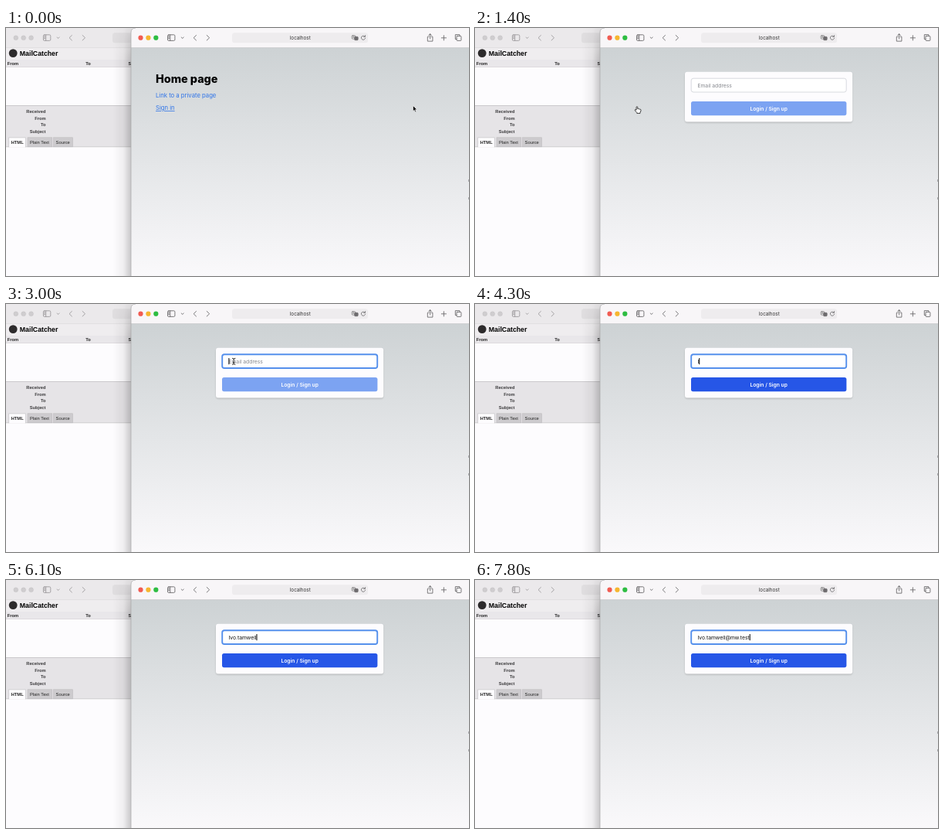
An HTML page that plays this animation: 600 by 321 pixels, repeating every 8000 ms.

```html
<!DOCTYPE html>
<html lang="en">
<head>
<meta charset="utf-8">
<title>Sign in by email</title>
<style>
  html, body { margin: 0; width: 100%; height: 100%; overflow: hidden; background: #fdfcfe; }
  svg { display: block; width: 100vw; height: 100vh; }
  text { font-family: Inter, sans-serif; white-space: pre; }
  .mail text { font: 5.76px "Liberation Sans", Arial, sans-serif; fill: #222; }
  .mail .b { font-weight: 700; }
  .mail .label { font-weight: 700; fill: #3b3a3c; text-anchor: end; }
  .mail .brand { font-size: 8.75px; font-weight: 700; fill: #000; }
  .icon { fill: none; stroke-width: .9; stroke-linecap: round; stroke-linejoin: round; }
  .link { font-size: 7.7px; fill: #2f74e8; }
  .field { font-size: 6.75px; }
</style>
</head>
<body>
<svg viewBox="0 0 600 321" preserveAspectRatio="none">
  <defs>
    <linearGradient id="sky" x1="0" y1="0" x2="0" y2="1">
      <stop offset="0" stop-color="#cdd2d4"/>
      <stop offset="1" stop-color="#faf9fb"/>
    </linearGradient>
    <linearGradient id="shade">
      <stop offset="0" stop-color="#000" stop-opacity="0"/>
      <stop offset=".55" stop-color="#000" stop-opacity=".05"/>
      <stop offset="1" stop-color="#000" stop-opacity=".22"/>
    </linearGradient>
    <linearGradient id="fadeIn" x1="0" y1="0" x2="0" y2="1">
      <stop offset="0" stop-color="#fff" stop-opacity=".25"/>
      <stop offset=".12" stop-color="#fff"/>
    </linearGradient>
    <mask id="shadeMask"><rect x="138" width="30" height="321" fill="url(#fadeIn)"/></mask>
    <filter id="soft" x="-10%" y="-20%" width="120%" height="150%">
      <feGaussianBlur stdDeviation="1.3"/>
    </filter>
    <g id="nav" class="icon">
      <rect x="0" y="8.8" width="9.4" height="7.6" rx="1.4"/>
      <path d="M3.3 8.8v7.6M1.2 10.7h.9M1.2 12.2h.9M1.2 13.7h.9"/>
      <path d="M17.7 12l1.5 1.4 1.5-1.4"/>
      <path d="M37 9.4l-3.4 3.3 3.4 3.3"/>
      <path d="M50.7 9.4l3.4 3.3-3.4 3.3"/>
    </g>
  </defs>

  <!-- Mail window -->
  <g class="mail">
    <rect width="170" height="321" fill="#fdfcfe"/>
    <rect width="170" height="25.5" fill="#ebe9eb"/>
    <rect y="25" width="170" height=".7" fill="#d2d0d2"/>
    <g fill="#cfcdcf" stroke="#bfbdbf" stroke-width=".4">
      <circle cx="12.8" cy="12.7" r="2.9"/>
      <circle cx="22.7" cy="12.7" r="2.9"/>
      <circle cx="32.6" cy="12.7" r="2.9"/>
    </g>
    <use href="#nav" x="48.4" stroke="#9d9b9e"/>
    <rect x="138" y="6.3" width="40" height="13" rx="3" fill="#e0dee0"/>
    <rect y="25.7" width="170" height="15.3" fill="#efedef"/>
    <circle cx="9.2" cy="32.6" r="5.4" fill="#2d2b2c"/>
    <text class="brand" x="17.8" y="35.8">MailCatcher</text>
    <rect y="41" width="170" height="9.5" fill="#e9e7ea"/>
    <rect y="50" width="170" height=".6" fill="#d0ced1"/>
    <text class="b" x="1.8" y="48">From</text>
    <text class="b" x="103.2" y="48">To</text>
    <text class="b" x="158.6" y="48">Subject</text>
    <rect y="100" width="170" height="54" fill="#e6e4e7"/>
    <rect y="100" width="170" height=".8" fill="#c4c2c5"/>
    <text class="label" x="51.5" y="109.9">Received</text>
    <text class="label" x="51.5" y="118.7">From</text>
    <text class="label" x="51.5" y="127.4">To</text>
    <text class="label" x="51.5" y="136.1">Subject</text>
    <g stroke="#bdbbbe" stroke-width=".6">
      <rect x="28" y="141.8" width="31.8" height="12" fill="#cdcbce"/>
      <rect x="61.6" y="141.8" width="24.8" height="12" fill="#cdcbce"/>
      <path d="M0 153.8h170"/>
      <path d="M3.6 154.3v-12.5h21.8v12.5" fill="#fdfcfe"/>
    </g>
    <text class="b" x="6.7" y="150.1">HTML</text>
    <text x="31" y="150">Plain Text</text>
    <text x="64.6" y="150">Source</text>
    <rect x="138" width="25" height="321" fill="url(#shade)" mask="url(#shadeMask)"/>
  </g>

  <!-- Browser window -->
  <path d="M162 321V6q0-6 6-6H600V321z" fill="url(#sky)"/>
  <rect x="162" y="25.5" width="438" height="295.5" fill="url(#sky)"/>
  <path d="M162 25.5V6q0-6 6-6H600V25.5z" fill="#f8f6f8"/>
  <rect x="162" y="25" width="438" height=".7" fill="#c6c8ca"/>
  <path d="M162 321V6q0-6 6-6" fill="none" stroke="#a9a9ab" stroke-width=".7"/>
  <circle cx="174.5" cy="12.7" r="3.1" fill="#f15b52"/>
  <circle cx="184.4" cy="12.7" r="3.1" fill="#f6b62f"/>
  <circle cx="194.3" cy="12.7" r="3.1" fill="#2dbd42"/>
  <use href="#nav" x="209.5" stroke="#6d6b6e"/>
  <rect x="293" y="6.3" width="176" height="13" rx="3" fill="#eeecee"/>
  <text x="381.3" y="15.1" font-size="6.3" text-anchor="middle" fill="#333">localhost</text>
  <g class="icon" stroke="#6d6b6e">
    <rect x="448.2" y="9.7" width="4.6" height="4.4" rx="1" fill="#fff" stroke-width=".7"/>
    <path d="M449.5 11h2M450.5 11l-1 2M450 11.6l1.4 1.4" stroke-width=".6"/>
    <rect x="451.6" y="11.3" width="4.6" height="4.4" rx="1" fill="#6d6b6e" stroke-width=".7"/>
    <path d="M465.2 11.2a2.6 2.6 0 1 0 .4 2M465.6 9.5l-.2 1.9-1.9-.1" stroke-width=".8"/>
    <path d="M548 11.2h-1.7v5.9h6.6v-5.9h-1.7M549.6 14V7.8M547.7 9.5l1.9-1.9 1.9 1.9"/>
    <path d="M567.4 9.7v6.2M564.3 12.8h6.2"/>
    <path d="M583.8 14.5h-1.5v-5.9h5.6v1.5"/>
    <rect x="584" y="10.4" width="5.9" height="6" rx=".8"/>
  </g>
  <path d="M599.5 196v3M599.5 219v3" stroke="#8b8d90" stroke-width=".7"/>

  <!-- Home page -->
  <g id="home">
    <text x="194" y="70.6" font-size="14.4" font-weight="800">Home page</text>
    <text class="link" x="194" y="90.4">Link to a private page</text>
    <text class="link" x="194" y="106.1" text-decoration="underline">Sign in</text>
  </g>

  <!-- Sign-in form -->
  <g id="form">
    <rect x="272.3" y="58" width="216.6" height="64.4" rx="3" opacity=".2" filter="url(#soft)"/>
    <rect x="272" y="56.8" width="217.2" height="64.6" rx="3" fill="#fdfcfe"/>
    <rect id="box" x="280.2" y="65.2" width="201" height="17.8" rx="2.8" fill="#fff"/>
    <text id="hint" class="field" x="288.4" y="76.6" fill="#85878d">Email address</text>
    <text id="typed" class="field" x="288.4" y="76.6" fill="#111"></text>
    <rect id="caret" y="70" width="1" height="8.2" fill="#000"/>
    <rect id="button" x="280" y="95" width="201.4" height="18.2" rx="2.6"/>
    <text class="field" x="380.7" y="106.5" font-weight="600" text-anchor="middle" fill="#fff">Login / Sign up</text>
  </g>

  <!-- Pointers, each with its hot spot at 0,0 -->
  <g id="arrow">
    <path d="M0 0V7.2L1.7 5.7 2.8 8.2 4 7.7 2.9 5.2H5.1z" fill="#000" stroke="#fff" stroke-width=".6"/>
  </g>
  <g id="hand">
    <path d="M-.9 4.2V.6Q-.9-.3-.1-.3T.8.6V2.7Q1.8 2.1 2.4 2.9 3.4 2.5 3.8 3.3 5 3 5 4.3 5 6.2 4 7.4V8.4H-.2V7.5Q-2 5.9-3 4.2-2.6 2.9-.9 4.2z"
      fill="#fff" stroke="#111" stroke-width=".8" stroke-linejoin="round"/>
  </g>
  <g id="beam" fill="none" stroke-linecap="round">
    <path d="M-1.7-4Q0-4 0-2.8 0-4 1.7-4M0-2.8V2.8M-1.7 4Q0 4 0 2.8 0 4 1.7 4M-.9 1.2H.9" stroke="#fff" stroke-width="1.7"/>
    <path d="M-1.7-4Q0-4 0-2.8 0-4 1.7-4M0-2.8V2.8M-1.7 4Q0 4 0 2.8 0 4 1.7 4M-.9 1.2H.9" stroke="#111" stroke-width=".9"/>
  </g>
</svg>
<script>
  const LOOP = 8000, TICK = 100;
  const PAGE_AT = 1400, FOCUS_AT = 3000, TYPE_AT = 4200;
  const EMAIL = 'Ivo.tamwell@mw.test';
  const KEYS = [4200, 4500, 4700, 4900, 5200, 5400, 5500, 5700, 5800, 6000, 6100,
                6500, 6700, 6800, 7000, 7200, 7400, 7500, 7700];
  const START = [527.5, 100.5], LINK = [210, 102], INPUT = [295.2, 74.3];

  const $ = id => document.getElementById(id);
  const show = (id, on) => $(id).setAttribute('visibility', on ? 'visible' : 'hidden');
  const set = (id, attrs) => {
    for (const k in attrs) $(id).setAttribute(k, attrs[k]);
  };
  const clamp = v => Math.min(1, Math.max(0, v));
  const ease = (t, from, to) => {
    const u = clamp((t - from) / (to - from));
    return u * u * (3 - 2 * u);
  };
  const mix = (a, b, p) => a.map((v, i) => v + (b[i] - v) * p);

  function pointerAt(t) {
    if (t < 1900) {
      const p = ease(t, 0, 1200);
      const [x, y] = mix(START, LINK, p);
      return [x, y + 27 * Math.sin(Math.PI * p ** 0.7) ** 2];
    }
    return mix(LINK, INPUT, ease(t, 1900, 2500));
  }

  function pointerKind(t, [x, y]) {
    if (t >= TYPE_AT) return '';
    if (t < PAGE_AT) return x < 219 && y < 109 ? 'hand' : 'arrow';
    if (t < 2000) return 'hand';
    return x > 280 && y < 83 ? 'beam' : 'arrow';
  }

  function draw(t) {
    const focused = t >= FOCUS_AT;
    const count = KEYS.filter(k => k <= t).length;
    show('home', t < PAGE_AT);
    set('form', { display: t < PAGE_AT ? 'none' : 'inline' });

    set('box', {
      stroke: focused ? '#5590ec' : '#cfd1d7',
      'stroke-width': focused ? 1.9 : 0.8
    });
    $('typed').textContent = EMAIL.slice(0, count);
    show('hint', t >= PAGE_AT && !count);

    // The caret blinks until typing starts.
    const lit = count > 0 || Math.floor((t - FOCUS_AT) / 500) % 2 === 0;
    const width = count ? $('typed').getComputedTextLength() : 0;
    set('caret', { x: 288.4 + width });
    show('caret', focused && lit);

    const blue = mix([124, 163, 242], [38, 86, 231], clamp((t - TYPE_AT + 100) / 200));
    set('button', { fill: `rgb(${blue.map(Math.round)})` });

    const at = pointerAt(t), kind = pointerKind(t, at);
    for (const id of ['arrow', 'hand', 'beam']) {
      show(id, id === kind);
      set(id, { transform: `translate(${at})` });
    }
  }

  const begin = performance.now();
  function frame() {
    const t = (performance.now() - begin) % LOOP;
    draw(Math.floor(t / TICK) * TICK);
    requestAnimationFrame(frame);
  }
  frame();
</script>
</body>
</html>
```
